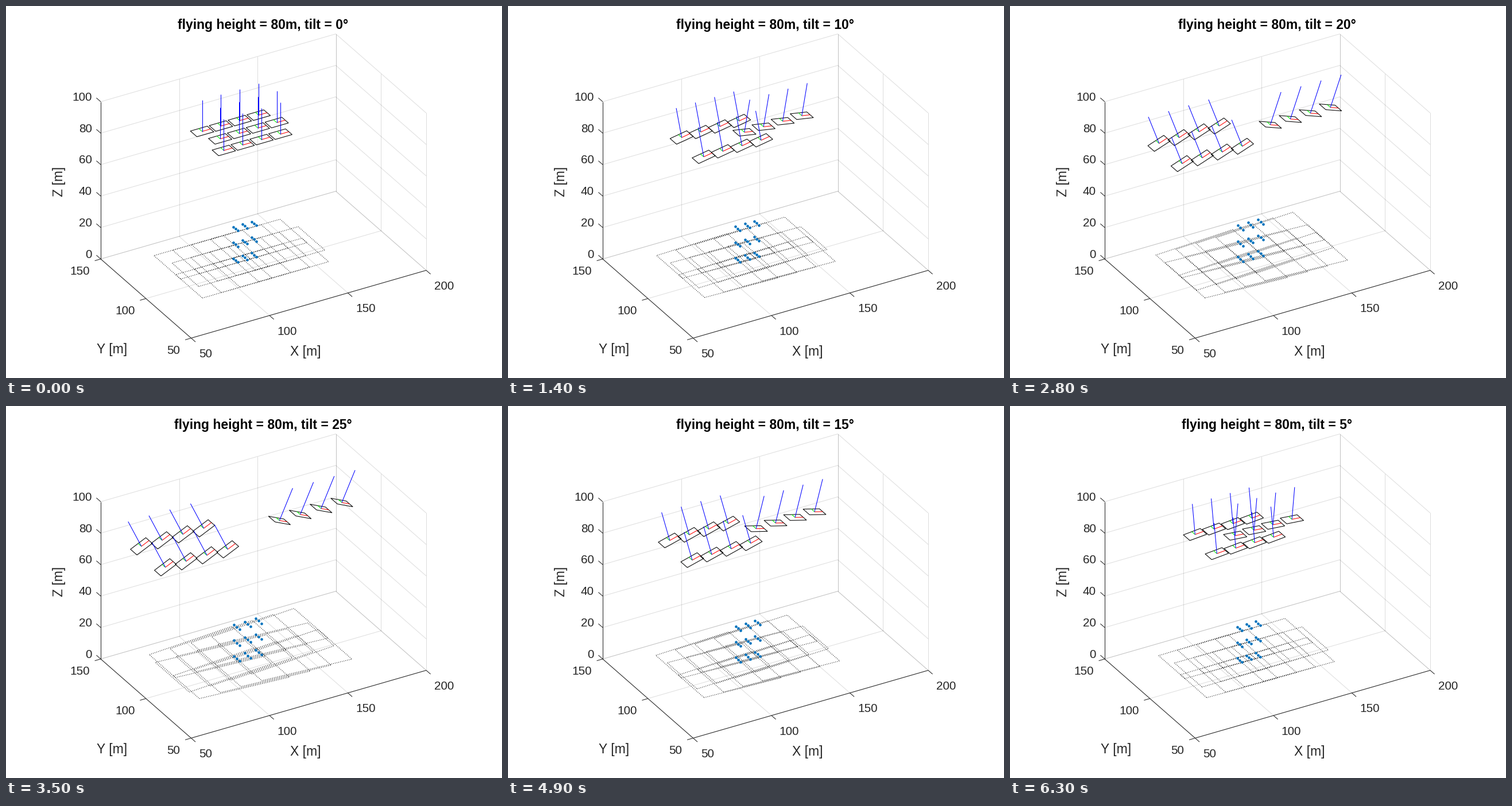
Write a matplotlib script that moves like this. It is 864 by 648 pixels and loops after 7 s.

```python
import itertools

import matplotlib.pyplot as plt
import numpy as np
from matplotlib.animation import FuncAnimation
from matplotlib.collections import LineCollection

W, H = 864, 648
TILTS = [0, 5, 10, 15, 20, 25, 20, 15, 10, 5]
STEP_MS = 700

HEIGHT = 80.0
HALF_X, HALF_Y = 22.22 / HEIGHT, 14.82 / HEIGHT   # half field of view per metre
CAM_W, CAM_H, AXIS = 5.4, 3.6, 20.0               # drawn half sizes, axis length
START, SPACING = np.array([99.6, 99.8]), 12.02

# Orthographic view: screen offset of one metre along x, y and z
ORIGIN = np.array([322.0, 578.0])
BASIS = np.array([[2.73, -0.787], [-1.575, -1.378], [0, -2.74]])
INK = "#262626"

plt.rcParams["font.family"] = "Liberation Sans"
fig = plt.figure(figsize=(W / 72, H / 72), dpi=72, facecolor="white")
ax = fig.add_axes([0, 0, 1, 1])
ax.set_xlim(-0.5, W - 0.5)
ax.set_ylim(H - 0.5, -0.5)
ax.axis("off")


def project(points):
    return ORIGIN + (np.asarray(points, float) - [50, 50, 0]) @ BASIS


def line(a, b, **style):
    xy = project([a, b])
    ax.plot(xy[:, 0], xy[:, 1], linewidth=1.04, solid_capstyle="butt", **style)


def label(x, y, text, size=20.8, **style):
    style = {"color": INK, "ha": "center", "va": "baseline", **style}
    return ax.text(x, y, text, fontsize=size, **style)


def draw_box():
    grid = dict(color=INK, alpha=0.15, zorder=1)
    xs, ys, zs = range(50, 201, 50), range(50, 151, 50), range(0, 101, 20)
    for x in xs:
        line((x, 50, 0), (x, 150, 0), **grid)
        line((x, 150, 0), (x, 150, 100), **grid)
    for y in ys:
        line((50, y, 0), (200, y, 0), **grid)
        line((200, y, 0), (200, y, 100), **grid)
    for z in zs:
        line((50, 150, z), (200, 150, z), **grid)
        line((200, 150, z), (200, 50, z), **grid)

    axis = dict(color=INK, zorder=2)
    line((50, 50, 0), (200, 50, 0), **axis)
    line((50, 50, 0), (50, 150, 0), **axis)
    line((50, 150, 0), (50, 150, 100), **axis)
    for x in xs:
        line((x, 50, 0), (x, 45.2, 0), **axis)
        px, py = project((x, 50, 0))
        label(px + 13.8, py + 33.5, x, ha="left")
    for y in ys:
        line((50, y, 0), (46.2, y, 0), **axis)
        px, py = project((50, y, 0))
        label(px - 19, py + 27.5, y, ha="right")
    for z in zs:
        line((50, 150, z), (50, 154.8, z), **axis)
        px, py = project((50, 150, z))
        label(px - 15.5, py - 2, z, ha="right")

    label(521, 609, "X [m]", 22.9)
    label(184.5, 605, "Y [m]", 22.9)
    label(98.5, 305, "Z [m]", 22.9, rotation=90, rotation_mode="anchor")


def cameras(tilt):
    """Yield the position and the x, y, z directions of every camera."""
    c, s = np.cos(tilt), np.sin(tilt)
    gap = SPACING / c
    for row, col in itertools.product((2, 1, 0), range(4)):
        turn = 1 if row == 1 else -1
        shift = 4.6 / c ** 2.4 if row == 1 else 0
        x = START[0] + col * gap + shift + turn * HEIGHT * np.tan(tilt)
        pos = np.array([x, START[1] + row * gap, HEIGHT])
        yield (pos, np.array([c, 0, -turn * s]), np.array([0, 1, 0]),
               np.array([turn * s, 0, c]))


def ground_points(tilt):
    c = np.cos(tilt)
    gap = SPACING / c
    mid_x = START[0] + 1.5 * gap + 2.3 / c ** 2.4
    mid_y = START[1] + gap
    dx, dy = 5.85 / c ** 1.7, 2.4 / c ** 2.5
    return [(mid_x + i * dx, mid_y + j * dy, z)
            for i, j, z in itertools.product((-1, 0, 1), (-1, 0, 1), (0, 10, 20))]


CORNERS = [(-1, -1), (1, -1), (1, 1), (-1, 1), (-1, -1)]


def collection(color, **style):
    lines = LineCollection([], colors=[color], linewidths=1.04, **style)
    return ax.add_collection(lines, autolim=False)


draw_box()
prints = collection("black", linestyles=[(0, (1, 2))], zorder=3)
frames = collection("black", zorder=5)
reds = collection("#ff0000", zorder=6)
greens = collection("#00ff00", zorder=6)
blues = collection("#0000ff", zorder=6)
dots, = ax.plot([], [], "o", color="#0072bd", markersize=4.6,
                markeredgewidth=0, zorder=4)
title = label(447, 39.5, "", 22.9, color="black", weight="bold")


def update(i):
    tilt = np.radians(TILTS[i])
    quads, rects, axes = [], [], ([], [], [])
    for pos, ux, uy, uz in cameras(tilt):
        rays = [a * HALF_X * ux + b * HALF_Y * uy - uz for a, b in CORNERS]
        quads.append(project([pos - ray * HEIGHT / ray[2] for ray in rays]))
        rects.append(project([pos + a * CAM_W * ux + b * CAM_H * uy
                              for a, b in CORNERS]))
        for segs, tip in zip(axes, (CAM_W * ux, CAM_H * uy, AXIS * uz)):
            segs.append(project([pos, pos + tip]))
    prints.set_segments(quads)
    frames.set_segments(rects)
    for lines, segs in zip((reds, greens, blues), axes):
        lines.set_segments(segs)
    dots.set_data(*project(ground_points(tilt)).T)
    title.set_text(f"flying height = {HEIGHT:.0f}m, tilt = {TILTS[i]}°")
    return prints, frames, reds, greens, blues, dots, title


anim = FuncAnimation(fig, update, frames=len(TILTS), interval=STEP_MS,
                     repeat=True, repeat_delay=0, blit=False)
plt.show()
```
